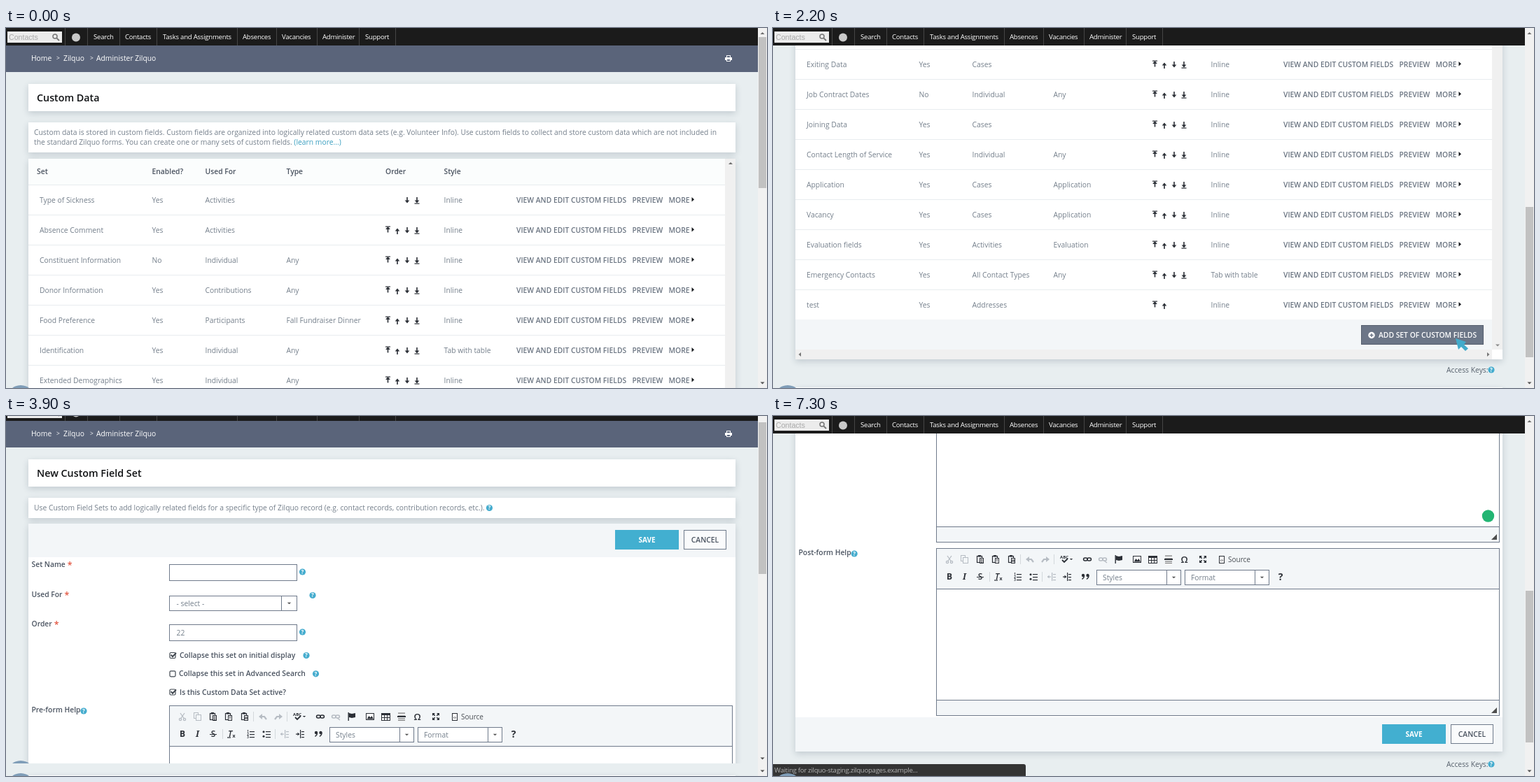
Recreate the animation shown at these times as an HTML page with a canvas. Size 1087 by 515 pixels, loop 8000 ms.

```html
<!DOCTYPE html>
<html lang="en">
<head>
<meta charset="utf-8">
<style>
html, body { margin: 0; width: 100%; height: 100%; overflow: hidden; background: #e8eef0; }
canvas { display: block; }
</style>
</head>
<body>
<canvas id="stage" width="1087" height="515"></canvas>
<script>
const W = 1087, H = 515, LOOP = 8000;
const ctx = document.getElementById('stage').getContext('2d');
const SANS = '"Open Sans", "Noto Sans", sans-serif';
const PAGE = '#e8eef0', PANEL = '#f3f6f8', LINE = '#e8ecef', BORDER = '#6f7a8b';
const BODY = '#747f8b', DARK = '#4a5360', INK = '#2b2f36', PALE = '#b6bcc3', BLUE = '#42afd0';
const APP = 'Zilquo';

function rect(x, y, w, h, color) {
  ctx.fillStyle = color;
  ctx.fillRect(x, y, w, h);
}
function frame(x, y, w, h, fill, stroke = BORDER) {
  rect(x, y, w, h, stroke);
  rect(x + 1, y + 1, w - 2, h - 2, fill);
}
function disc(x, y, r, color) {
  ctx.fillStyle = color;
  ctx.beginPath();
  ctx.arc(x, y, r, 0, 7);
  ctx.fill();
}
function poly(color, ...p) {
  ctx.fillStyle = color;
  ctx.beginPath();
  for (let i = 0; i < p.length; i += 2) ctx.lineTo(p[i], p[i + 1]);
  ctx.fill();
}
function path(color, width, ...p) {
  ctx.strokeStyle = color;
  ctx.lineWidth = width;
  ctx.beginPath();
  for (let i = 0; i < p.length; i += 2) ctx.lineTo(p[i], p[i + 1]);
  ctx.stroke();
}
// y is the middle of the capitals
function text(str, x, y, color = BODY, o = {}) {
  const size = o.size || 10.33;
  ctx.font = `${o.style || ''} ${o.weight || 400} ${size}px ${o.family || SANS}`;
  ctx.letterSpacing = (o.gap || 0) + 'px';
  ctx.textAlign = o.align || 'left';
  ctx.fillStyle = color;
  ctx.fillText(str, x, Math.round(y + size * 0.357));
  ctx.letterSpacing = '0px';
}
const semi = (str, x, y, color = DARK, o = {}) => text(str, x, y, color, { weight: 600, ...o });

function card(x, y, w, h) {
  ctx.save();
  ctx.shadowColor = 'rgba(40,60,80,.2)';
  ctx.shadowBlur = 9;
  ctx.shadowOffsetY = 3;
  rect(x, y, w, h, '#fff');
  ctx.restore();
}
function clipped(x, y, w, h, draw) {
  ctx.save();
  ctx.beginPath();
  ctx.rect(x, y, w, h);
  ctx.clip();
  draw();
  ctx.restore();
}
function help(x, y) {
  disc(x, y, 4.6, '#45acce');
  text('?', x, y, '#fff', { size: 8, weight: 700, align: 'center' });
}
function caret(x, y, r = 3, color = '#555') {
  poly(color, x - r, y - r / 2, x + r, y - r / 2, x, y + r / 2);
}
function caretUp(x, y) {
  poly('#6d6d6d', x - 3, y + 2, x + 3, y + 2, x, y - 1);
}

// Shared page chrome

function nav() {
  rect(0, 0, 1074, 25, '#1b1b1b');
  rect(2, 5, 78, 16, '#ececec');
  text('Contacts', 4, 13, '#a9a9a9', { size: 10.6, family: '"Liberation Sans", Arial, sans-serif' });
  ctx.strokeStyle = '#777';
  ctx.lineWidth = 1.5;
  ctx.beginPath();
  ctx.arc(70, 12, 3, 0, 7);
  ctx.stroke();
  path('#777', 1.8, 72.3, 14.3, 76, 18);
  disc(100, 13.5, 6, '#c9c9c9');
  for (const x of [84, 116, 162, 215, 330, 386, 444, 504, 556]) rect(x, 0, 1, 25, '#454545');
  const items = { Search: 125, Contacts: 170, 'Tasks and Assignments': 224, Absences: 338,
    Vacancies: 394, Administer: 452, Support: 513 };
  for (const name in items) text(name, items[name], 13, '#fff', { size: 9.6, gap: -0.25 });
}
function scrollbar(top, bottom) {
  rect(1074, 0, 13, H, '#f1f1f1');
  rect(1075, top, 11, bottom - top, '#c1c1c1');
  caretUp(1080.5, 7);
  caret(1080.5, 508, 3, '#505050');
}
function badge() {
  disc(21, 531, 20, '#7f9db8');
}
function printer(x, y) {
  frame(x - 3, y - 4, 6, 4, '#5a657b', '#fff');
  rect(x - 5, y - 1, 10, 4, '#fff');
  frame(x - 3, y + 1, 6, 4, '#5a657b', '#fff');
}
function header(title) {
  rect(0, 25, 1074, 38, '#5a647a');
  text('Home', 36, 43, '#fff');
  text('>', 72, 43, '#fff', { size: 8.5 });
  text(APP, 82, 43, '#fff');
  text('>', 120, 43, '#fff', { size: 8.5 });
  text('Administer ' + APP, 129, 43, '#fff');
  printer(1032, 43);
  card(32, 80, 1010, 39);
  semi(title, 44, 99.5, '#101214', { size: 14.3 });
}
function accessKeys(y) {
  text('Access Keys:', 962, y, '#56606c');
  help(1026, y);
}

// Table of sets

function orderArrow(x, y, dir, bar) {
  path(INK, 1.6, x, y - 4 * dir, x, y + 2 * dir);
  poly(INK, x - 3.3, y + 0.6 * dir, x + 3.3, y + 0.6 * dir, x, y + 4.4 * dir);
  if (bar) rect(x - 3.5, Math.round(y + 5 * dir) - 0.5, 7, 1.2, INK);
}
function row(y, [name, on, used, type, style = 'Inline', order = 15]) {
  text(name, 48, y);
  text(on, 208.5, y);
  text(used, 284.5, y);
  text(type, 400.5, y);
  text(style, 625.5, y);
  if (order & 1) orderArrow(545.5, y - 0.5, -1, true);
  if (order & 2) orderArrow(559, y + 2, -1);
  if (order & 4) orderArrow(573, y, 1);
  if (order & 8) orderArrow(587, y, 1, true);
  semi('VIEW AND EDIT CUSTOM FIELDS', 729, y, '#6b7582');
  semi('PREVIEW', 894.5, y, '#6b7582');
  semi('MORE', 946.5, y, '#6b7582');
  poly('#15181c', 979.5, y - 4, 983, y - 0.8, 979.5, y + 2.4);
  rect(32, y + 21, 995, 1, LINE);
}
const topRows = [
  ['Type of Sickness', 'Yes', 'Activities', '', 'Inline', 12],
  ['Absence Comment', 'Yes', 'Activities', ''],
  ['Constituent Information', 'No', 'Individual', 'Any'],
  ['Donor Information', 'Yes', 'Contributions', 'Any'],
  ['Food Preference', 'Yes', 'Participants', 'Fall Fundraiser Dinner'],
  ['Identification', 'Yes', 'Individual', 'Any', 'Tab with table'],
  ['Extended Demographics', 'Yes', 'Individual', 'Any']
];
const endRows = [
  ['Exiting Data', 'Yes', 'Cases', ''],
  ['Job Contract Dates', 'No', 'Individual', 'Any'],
  ['Joining Data', 'Yes', 'Cases', ''],
  ['Contact Length of Service', 'Yes', 'Individual', 'Any'],
  ['Application', 'Yes', 'Cases', 'Application'],
  ['Vacancy', 'Yes', 'Cases', 'Application'],
  ['Evaluation fields', 'Yes', 'Activities', 'Evaluation'],
  ['Emergency Contacts', 'Yes', 'All Contact Types', 'Any', 'Tab with table'],
  ['test', 'Yes', 'Addresses', '', 'Inline', 3]
];

function listTop() {
  rect(0, 0, W, H, PAGE);
  header('Custom Data');
  card(32, 135, 1010, 43);
  text('Custom data is stored in custom fields. Custom fields are organized into logically related custom data sets (e.g. Volunteer Info). Use custom fields to collect and store custom data which are not included in', 40, 149.5);
  const tail = `the standard ${APP} forms. You can create one or many sets of custom fields. `;
  text(tail, 40, 163);
  text('(learn more...)', 40 + ctx.measureText(tail).width, 163, '#3a9fc0');
  card(32, 187, 1010, 340);
  rect(32, 187, 995, 37, '#fbfdfd');
  rect(1027, 187, 15, 328, '#f0f0f0');
  caretUp(1035, 193);
  const heads = { Set: 44, 'Enabled?': 208.5, 'Used For': 284.5, Type: 400.5, Order: 542, Style: 625.5 };
  for (const name in heads) semi(name, heads[name], 205);
  rect(32, 224, 995, 1, LINE);
  topRows.forEach((r, i) => row(246 + 43 * i, r));
  badge();
  nav();
  scrollbar(13, 229);
}

function listEnd() {
  rect(0, 0, W, H, PAGE);
  card(32, -20, 1010, 494);
  rect(32, 30, 995, 1, LINE);
  endRows.forEach((r, i) => row(52 + 43 * i, r));
  rect(32, 417, 995, 43, PANEL);
  rect(1027, 25, 15, 435, '#f0f0f0');
  rect(32, 460, 995, 14, '#f0f0f0');
  caret(1035, 454, 3, '#8a8a8a');
  poly('#777', 40, 464, 40, 470, 36.5, 467);
  poly('#777', 1020, 464, 1020, 470, 1023.5, 467);
  frame(840, 425, 175, 28, '#6c7687', '#555e6d');
  disc(855, 439.5, 4.7, '#fff');
  path('#6c7687', 1.5, 852.4, 439.5, 857.6, 439.5);
  path('#6c7687', 1.5, 855, 437, 855, 442);
  semi('ADD SET OF CUSTOM FIELDS', 865, 439.5, '#fff');
  accessKeys(489);
  card(32, 514, 1010, 20);
  badge();
  nav();
  scrollbar(256, 471);
}
function pointer() {
  poly('#42abcb', 975, 444, 990, 449, 987, 453, 993, 458.5, 989, 462, 983, 456, 979, 460);
}

// Form

function label(str, y, required) {
  semi(str, 36.5, y);
  const end = 36.5 + ctx.measureText(str).width;
  if (required) semi('*', end + 3, y + 1.5, '#e2543f', { size: 12.5 });
  return end;
}
function input(y, value) {
  frame(233, y, 183, 24, '#fff');
  text(value, 243.5, y + 12);
}
function select(x, y, w, value, split, inset = 10.5) {
  frame(x, y, w, 22, '#fff');
  rect(x + split, y, 1, 22, BORDER);
  text(value, x + inset, y + 11);
  caret(x + (split + w) / 2, y + 11, 2.7);
}
function check(x, y, str, on, helpX) {
  ctx.strokeStyle = '#3f464f';
  ctx.lineWidth = 1.2;
  ctx.beginPath();
  ctx.roundRect(x - 4, y - 4, 8, 8, 1.5);
  ctx.stroke();
  if (on) path('#3f464f', 2, x - 2.3, y - 0.8, x, y + 1.8, x + 5, y - 3.6);
  semi(str, x + (on ? 10 : 9), y);
  if (helpX) help(helpX, y);
}
function buttons(y) {
  rect(870, y, 91, 28, BLUE);
  semi('SAVE', 915.5, y + 14, '#fff', { align: 'center', weight: 700, size: 10 });
  frame(968, y, 61, 28, '#fafbfc');
  semi('CANCEL', 998.5, y + 14, DARK, { align: 'center' });
}

function clipboard(x, y, mark) {
  ctx.strokeStyle = INK;
  ctx.lineWidth = 1.2;
  ctx.strokeRect(x - 4.5, y - 4.5, 7, 9);
  rect(x - 3, y - 6, 4, 2.5, INK);
  frame(x - 1, y - 2, 6, 8, '#fff', INK);
  if (mark) text(mark, x + 2, y + 2, INK, { size: 5, weight: 700, align: 'center' });
  else for (const d of [0, 2, 4]) rect(x + 0.5, y + d, 3, 1, INK);
}
function turn(x, y, dir) {
  poly(PALE, x - 6 * dir, y, x - dir, y - 4, x - dir, y + 4);
  path(PALE, 2.2, x - 2 * dir, y, x + 2 * dir, y, x + 5 * dir, y + 4);
}
function chain(x, y, color) {
  ctx.strokeStyle = color;
  ctx.lineWidth = 1.6;
  for (const d of [-2.7, 2.7]) {
    ctx.beginPath();
    ctx.roundRect(x + d - 2.7, y - 2, 5.4, 4, 2);
    ctx.stroke();
  }
}
function bars(x, y, w, color, n = 3) {
  for (let i = 0; i < n; i++) rect(x, y - 4 + i * 8 / (n - 1), w, 1.2, color);
}
function rowOne(y) {
  path(PALE, 1.3, 249, y - 5, 254.5, y + 3);
  path(PALE, 1.3, 255, y - 5, 249.5, y + 3);
  ctx.strokeStyle = PALE;
  for (const x of [249, 255]) {
    ctx.beginPath();
    ctx.arc(x, y + 4, 1.6, 0, 7);
    ctx.stroke();
  }
  frame(268, y - 6, 7, 9, PANEL, PALE);
  frame(271, y - 3, 8, 9, PANEL, PALE);
  clipboard(296, y);
  clipboard(318, y, 'T');
  clipboard(341, y, 'W');
  rect(353, y - 7, 1, 14, '#d3d8dc');
  turn(367, y, 1);
  turn(389, y, -1);
  rect(401, y - 7, 1, 14, '#d3d8dc');
  text('ABC', 416, y - 3, INK, { size: 6, weight: 700, align: 'center' });
  path(INK, 1.8, 413, y + 1, 416, y + 4, 421, y - 1);
  caret(426, y, 2.2, INK);
  chain(449, y, INK);
  chain(471, y, PALE);
  path(PALE, 1.3, 473, y + 2, 477, y + 5);
  rect(488.5, y - 6, 1.4, 12, INK);
  poly(INK, 490, y - 5, 494, y - 4, 499, y - 5, 499, y + 1, 494, y + 2, 490, y + 1);
  frame(514, y - 5, 12, 10, '#fff', INK);
  poly(INK, 515.5, y + 3.5, 518.5, y - 1, 520.5, y + 1.5, 522.5, y - 1, 525, y + 3.5);
  frame(536, y - 5, 13, 11, '#fff', INK);
  rect(536, y - 5, 13, 3, INK);
  for (const x of [540, 544]) rect(x, y - 3, 1, 8, INK);
  rect(537, y + 1, 11, 1, INK);
  bars(560, y - 1.5, 10, '#777', 3);
  rect(559, y - 1, 12, 2, INK);
  rect(560, y + 5, 10, 1, '#777');
  text('Ω', 587.5, y, INK, { size: 13, weight: 600, align: 'center' });
  for (const sx of [-1, 1]) for (const sy of [-1, 1]) {
    const cx = 614 + 5 * sx, cy = y + 5 * sy;
    poly(INK, cx, cy, cx - 4 * sx, cy, cx, cy - 4 * sy);
    path(INK, 1.6, cx - sx, cy - sy, 614 + 1.3 * sx, y + 1.3 * sy);
  }
  frame(637, y - 5, 8, 11, '#fff', INK);
  text('‹›', 641, y + 0.5, INK, { size: 6, weight: 700, align: 'center' });
  text('Source', 650, y, '#4a4f55', { size: 10 });
}
function rowTwo(y) {
  const mid = { align: 'center', size: 12 };
  text('B', 252, y, INK, { ...mid, weight: 700 });
  text('I', 273.5, y, INK, { ...mid, weight: 700, style: 'italic', family: '"Noto Serif", serif' });
  text('S', 296, y, INK, { ...mid, weight: 600 });
  rect(291, y, 10, 1, INK);
  rect(309, y - 7, 1, 14, '#d3d8dc');
  text('T', 320, y - 0.5, INK, { ...mid, style: 'italic', weight: 600 });
  path(INK, 1.2, 316, y + 5, 321, y + 5);
  text('x', 325.5, y + 3, INK, { size: 7, weight: 700, align: 'center' });
  for (const [x, w] of [[348, 7], [371, 7]]) bars(x, y, w, INK);
  for (const [i, d] of [[1, -3.5], [2, 0.5], [3, 4]])
    text(i, 345.5, y + d, INK, { size: 4.5, weight: 700, align: 'center' });
  for (const d of [-3.3, 3.3]) disc(368, y + d, 1.5, INK);
  rect(384, y - 7, 1, 14, '#d3d8dc');
  for (const [x, color, dir] of [[398, PALE, -1], [420, INK, 1]]) {
    rect(x, y - 6, 1.2, 12, color);
    bars(x + 2, y, 4, color);
    rect(x - 6, y - 0.5, 5, 1.2, color);
    poly(color, x - 3.5 + 2.5 * dir, y, x - 3.5, y - 2.5, x - 3.5, y + 2.5);
  }
  for (const x of [443, 449.5]) {
    disc(x, y - 2, 2.2, INK);
    path(INK, 1.5, x + 1.5, y - 2, x + 1, y + 1, x - 1.5, y + 3.5);
  }
  select(462, y - 10, 121, 'Styles', 100, 9);
  select(588, y - 10, 121, 'Format', 100, 9);
  text('?', 725, y, INK, { size: 14, weight: 700, align: 'center' });
}
function editor(y, name) {
  help(label(name, y + 6) + 4.5, y + 8);
  frame(233, y, 805, 240, '#fff');
  rect(234, y + 1, 803, 57, PANEL);
  rect(234, y + 58, 803, 1, BORDER);
  rect(234, y + 217, 803, 1, BORDER);
  rect(234, y + 218, 803, 21, PANEL);
  poly('#4d4d4d', 1034, y + 228, 1034, y + 236, 1026, y + 236);
  rowOne(y + 16);
  rowTwo(y + 41);
}

function formBody(o) {
  const extra = o.full ? 68 : 0, pre = 432 + extra, post = pre + 248;
  header('New Custom Field Set');
  card(32, 135, 1010, 29);
  const note = `Use Custom Field Sets to add logically related fields for a specific type of ${APP} record (e.g. contact records, contribution records, etc.).`;
  text(note, 40, 149.5);
  help(40 + ctx.measureText(note).width + 7, 149.5);
  card(32, 172, 1010, post + 291 - 172);
  rect(32, 172, 1010, 48, PANEL);
  buttons(181);
  label('Set Name', 230, true);
  input(230, o.name);
  help(423.5, 241);
  label('Used For', 273.5, true);
  select(233, 275, 183, o.used, 160);
  help(438, 274.5);
  label('Order', 315.5, true);
  input(316, '22');
  help(423.5, 327);
  if (o.full) {
    check(240.5, 360.5, 'Does this Custom Field Set allow multiple records?', false, 514.5);
    label('Display Style', 385.5);
    select(233, 387, 183, 'Inline', 160);
    help(435.5, 397);
  }
  check(238, 360.5 + extra, 'Collapse this set on initial display', true, 429);
  check(238, 386.8 + extra, 'Collapse this set in Advanced Search', o.full, o.full ? 444.5 : 442.5);
  check(238, 413 + extra, 'Is this Custom Data Set active?', true);
  editor(pre, 'Pre-form Help');
  editor(post, 'Post-form Help');
  rect(32, post + 242, 1010, 49, PANEL);
  buttons(post + 252);
  accessKeys(post + 309);
}
function form(scroll, thumb, o) {
  rect(0, 0, W, H, PAGE);
  ctx.save();
  ctx.translate(0, -scroll);
  formBody(o);
  ctx.restore();
  nav();
  scrollbar(thumb, thumb + 217);
}

const filled = { full: true, name: 'Project Location', used: 'Contacts' };

function newForm() {
  listEnd();
  clipped(0, 0, W, 497, () => {
    ctx.translate(0, -18);
    form(0, 27, { name: '', used: '- select -' });
    badge();
  });
}
function filledForm() {
  form(84, 49, filled);
  badge();
}
function formEnd() {
  form(559, 250, filled);
  disc(1021.5, 143, 8.7, '#23b573');
  ctx.fillStyle = '#343434';
  ctx.beginPath();
  ctx.roundRect(-4, 498, 365, 24, 3);
  ctx.fill();
  text('Waiting for zilquo-staging.zilquopages.example...', 2, 507, '#b4b4b4', { size: 9.55, gap: -0.25 });
  badge();
}

const scenes = [
  [7300, formEnd],
  [5600, filledForm],
  [3900, newForm],
  [2200, () => { listEnd(); pointer(); }],
  [500, listEnd],
  [0, listTop]
];
const start = performance.now();

function tick(now) {
  const t = Math.max(0, now - start) % LOOP;
  scenes.find(([from]) => t >= from)[1]();
  requestAnimationFrame(tick);
}
tick(start);
</script>
</body>
</html>
```
